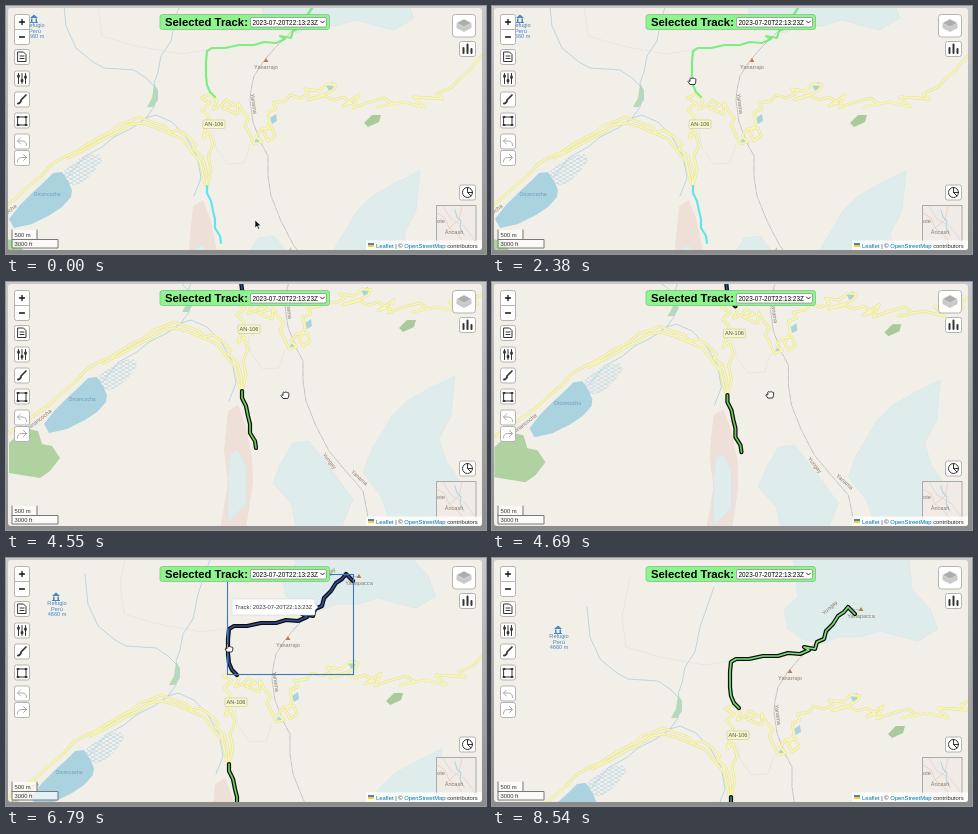
Animation of 480 by 248 pixels, one loop 8610 ms. Source, as an HTML page:

```html
<!DOCTYPE html>
<html lang="en">
<meta charset="utf-8">
<title>Track selection map</title>
<style>
html, body { margin: 0; width: 100%; height: 100%; overflow: hidden; background: #999 }
svg { display: block; width: 480px; height: 248px; font-family: "Liberation Sans", Arial, sans-serif }
polyline, .line { fill: none; stroke-linejoin: round; stroke-linecap: round }
.water { fill: #aad3df }
.ice { fill: #dfecec; stroke: #d0e3e6; stroke-width: .5 }
.wood { fill: #b0d2a0 }
.stream { stroke: #b3d3e0; stroke-width: .9 }
.trail { stroke: #e8e0da; stroke-width: .7 }
.border { stroke: #bbb5bb; stroke-width: .8; stroke-dasharray: 5 1.2 1.2 1.2 }
.case { stroke: #e2df9c; stroke-width: 2.8 }
.fill { stroke: #f7f6b6; stroke-width: 1.8 }
.place { font-size: 5.6px; fill: #8b7a6d; text-anchor: middle }
.outline { stroke: #0a0f0a; stroke-width: 4.2 }
.core { stroke-width: 1.7 }
.p0 .outline { stroke: none }
.p0 .core { stroke-width: 2.2; stroke-opacity: .8 }
.p0 .upper { stroke: #62ee6b } .p0 .lower { stroke: #3de4ec }
.p1 .upper { stroke: #344a9c } .p1 .lower { stroke: #6ccb58 }
.p2 .upper { stroke: #7be07b } .p2 .lower { stroke: #2c9483 }
.btn { fill: #fff; stroke: #b5b3b0; stroke-width: 1 }
.icon { fill: none; stroke: #333; stroke-width: 1; stroke-linecap: round; stroke-linejoin: round }
.off { stroke: #aaa }
.small { font-size: 5.85px; fill: #333 }
.hover rect { fill: none; stroke: #3878bd; stroke-width: 1.1 }
.hover .tip { fill: #fff; stroke: #ccc; stroke-width: .5 }
</style>
<svg id="stage" viewBox="0 0 480 248">
<defs>
  <pattern id="marsh" width="7" height="4" patternUnits="userSpaceOnUse">
    <path d="M0 1h4M3.5 3h3.5" stroke="#9ccbe2" stroke-width=".8"/>
  </pattern>
  <linearGradient id="frame" x2="0" y2="1"><stop stop-color="#c9c9c9"/><stop offset="1" stop-color="#8b8b8b"/></linearGradient>
  <clipPath id="view"><rect x="2" y="2" width="474" height="242" rx="3"/></clipPath>
  <polyline id="road" points="-40,228 -22,214 -6,204 8,194 22,181 35,170 46,158 60,150 70,146 82,138 92,132 103,127 112,119 124,115 133,111 146,116 158,120 164,126 172,124 181,130 190,139 187,143 196,150 200,164 201,180"/>
  <polyline id="strand" points="62,152 80,143 96,134 108,128 122,119 134,117 148,121 160,126 176,133 186,146 194,156 199,178"/>
  <polyline id="loops" points="201,180 205,164 202,150 207,139 203,126 197,132 203,111 196,104 204,97 195,92 204,88 211,95 207,103 215,100 220,94 228,99 217,102 231,108 232,97 237,106 243,112 239,119 245,131 248,138 256,136 250,130 256,123 266,122 269,130 262,135 258,127 264,117 262,106 270,103 267,97 279,95 284,89 294,92 303,88 299,83 313,85 321,78 330,79 327,84 314,91 302,94"/>
  <polyline id="east" points="303,93 316,89 328,94 337,91 346,97 337,100 353,89 347,102 360,97 378,92 387,98 372,101 397,96 418,101 408,91 425,92 437,93 431,88 446,81 455,71 463,65 469,57 478,48"/>
  <polyline id="upper" points="209,91 204,86 201,79 200,70 200,55 201,45 206,42 219,42 233,39 248,39 258,36 270,37 279,33 274,30 285,32 287,25 294,22 296,14 303,7 308,-1 314,-5 318,-10 325,-3"/>
  <polyline id="lower" points="201,180 201,187 205,195 207,205 209,213 209,222 214,230 215,237"/>
</defs>
<rect width="480" height="248" fill="url(#frame)"/>
<g clip-path="url(#view)">
  <rect width="480" height="248" fill="#f2efe9"/>
  <g id="map">
    <polygon class="ice" points="262,-70 268,-20 254,-7 258,12 272,22 292,27 308,20 330,20 350,14 372,20 388,24 408,12 400,-8 382,-28 378,-70"/>
    <polygon class="ice" points="414,165 389,177 366,190 350,206 341,222 330,240 322,262 340,285 352,320 440,330 425,280 405,250 398,228 410,205"/>
    <polygon class="ice" points="252,232 240,252 232,272 250,292 258,330 295,330 312,288 287,254 268,230"/>
    <polygon points="187,200 197,194 204,212 211,245 212,272 203,330 177,330 187,272 183,240" fill="#eee0d8"/>
    <polygon class="ice" points="189,243 197,239 205,256 205,293 187,311 187,271"/>
    <polygon class="wood" points="-32,232 -16,217 -3,220 1,233 11,235 19,247 9,260 -1,267 -32,262"/>
    <polygon points="358,117 366,109 375,109 373,116 362,121" fill="#a9cb9b"/>
    <polygon points="141,101 146,92 148,78 152,84 152,94 147,101" fill="#b8d9b8"/>
    <polygon points="55,168 66,158 78,150 92,148 97,153 88,166 76,177 64,180" fill="url(#marsh)"/>
    <polygon class="water" points="3,213 14,199 26,187 38,176 47,167 56,166 62,175 66,184 65,191 56,201 44,209 26,218 8,222"/>
    <polygon class="water" points="264,112 270,108 271,115 266,118"/>
    <polygon class="water" points="320,79 327,76 329,82 323,85"/>
    <polygon class="water" points="249,134 254,131 255,136 250,138"/>
    <polyline class="trail" points="100,-40 92,0 96,30 130,40 175,48 200,44"/>
    <polyline class="trail" points="207,125 210,142 222,158 238,157 244,139"/>
    <polyline class="stream" points="57,-10 60,20 70,42 87,56 98,62 128,64 140,72 148,80"/>
    <polyline class="stream" points="62,170 78,151 96,141 108,131 126,122 140,112 148,101 151,88 148,77 152,66 155,50 165,35 170,10 184,-30"/>
    <polyline class="stream" points="140,112 150,109 166,116 180,131 191,150 195,172 188,190"/>
    <polyline class="border" points="331,-7 316,-9 305,1 298,16 283,28 268,43 257,56 248,70 245,84 244,95 247,116 255,137 262,150 262,170 265,190 275,215 288,240 303,258 322,280 326,300 330,330"/>
    <g class="case"><use href="#strand"/><use href="#road"/><use href="#loops"/><use href="#east"/></g>
    <g class="fill"><use href="#strand"/><use href="#road"/><use href="#loops"/><use href="#east"/></g>
    <rect x="197" y="114" width="22" height="8.5" rx="1" fill="#f6f6c8" stroke="#cfcd9c" stroke-width=".7"/>
    <g class="place">
      <text x="208" y="120.3" fill="#555">AN-106</text>
      <path d="M260 52l2.4 4h-4.8zM331-10l2.4 4h-4.8z" fill="#b97a4c"/>
      <text x="260" y="63">Yanarrajo</text>
      <text x="331" y="1">Yanapacca</text>
      <text transform="translate(246 98) rotate(82)">Yanama</text>
      <text transform="translate(301 -8) rotate(-42)">Yungay</text>
      <text transform="translate(287 251) rotate(52)">Yungay</text>
      <text transform="translate(317 268) rotate(42)">Yanama</text>
      <text transform="translate(-2 211) rotate(-38)">Chinancocha</text>
      <text x="41" y="190" style="fill:#6a9bb5;font-size:5px">Orconcocha</text>
      <g style="fill:#4687c4">
        <path d="M24 12l4-3.500 4 3.500zM25 12.500h1.500V16H25zM29.500 12.500H31V16h-1.500zM24 16h8v1h-8z"/>
        <text x="29" y="21">Refugio</text><text x="29" y="26.5">Perú</text><text x="29" y="32">4660 m</text>
      </g>
    </g>
    <g class="outline"><use href="#upper"/><use href="#lower"/></g>
    <g class="core"><use class="upper" href="#upper"/><use class="lower" href="#lower"/></g>
  </g>

  <g id="hoverLower" class="hover">
    <rect x="198.5" y="179" width="16.5" height="59"/>
    <path class="tip" d="M206 205.5l3-3v-3.5q0-1 1-1h81q1 0 1 1v13q0 1-1 1h-81q-1 0-1-1v-3.5z"/>
    <text class="small" x="212" y="207.7">Track: 2023-07-21T21:20:16Z</text>
  </g>
  <g id="hoverUpper" class="hover">
    <rect x="221.5" y="16.5" width="126" height="100"/>
    <path class="tip" d="M312 49l-3-3v-4q0-1-1-1h-81q-1 0-1 1v14q0 1 1 1h81q1 0 1-1v-4z"/>
    <text class="small" x="229" y="51">Track: 2023-07-20T22:13:23Z</text>
  </g>

  <rect x="154" y="8.5" width="169.5" height="15" rx="2.5" fill="#8ef58e" stroke="#7fc583" stroke-width=".8"/>
  <text x="159" y="20" font-size="11.3" font-weight="bold">Selected Track:</text>
  <rect x="244.5" y="11.5" width="76" height="9.5" rx="1.5" fill="#fff" stroke="#777" stroke-width=".6"/>
  <text x="246.5" y="18.6" font-size="6.4">2023-07-20T22:13:23Z</text>
  <path class="icon" d="M314.5 15l2 2 2-2"/>

  <g class="btn">
    <rect x="8.5" y="8.5" width="15" height="30" rx="2"/><path d="M8.5 23.5h15"/>
    <g id="buttons"></g>
    <rect x="446.5" y="8.5" width="23" height="22.5" rx="3"/>
    <rect x="453.5" y="35.5" width="16" height="15" rx="2"/>
    <rect x="453.5" y="179" width="16" height="15" rx="2"/>
  </g>
  <g class="icon">
    <path d="M13.500 16h5M16 13.500v5M13.500 31h5" stroke="#111" stroke-width="1.300"/>
    <path d="M12 46h5.500l2.500 2.500v7h-8zM14 50h4M14 52.500h4"/>
    <path d="M12.500 67.500v10M16 67.500v10M19.500 67.500v10"/>
    <path d="M12.500 70v.5M16 74.500v.5M19.500 71v.5" stroke-width="2.800"/>
    <path d="M15 94l5-5" stroke-width="1.700"/><path d="M12 97.500q2 0 3-2.500" stroke-width="2"/>
    <path d="M12 111h8v8h-8z"/>
    <path d="M11.500 111h1M19.500 111h1M11.500 119h1M19.500 119h1" stroke-width="2"/>
    <path class="off" d="M14.500 132l-3 3 3 3M11.500 135h5q4 0 4 4.500"/>
    <path class="off" d="M17.500 148.500l3 3-3 3M20.500 151.500h-5q-4 0-4 4.500"/>
    <path d="M457.500 47v-5M461.500 47v-8.500M465.500 47v-4" stroke-width="2"/>
    <circle cx="461.500" cy="186.500" r="5"/><path d="M461.500 181.500v5h5M461.500 186.500l3.500 3.500"/>
  </g>
  <path d="M450.500 17.500v4.500l7.500 4 7.500-4v-4.500z" fill="#c9c9c9"/>
  <path d="M450.500 17l7.500 4 7.500-4-7.500-4z" fill="#adadad" stroke="#eee" stroke-width=".5"/>

  <g id="mini">
    <rect x="430.500" y="199.500" width="39.500" height="40" fill="#f0ebe6" stroke="#aaa" stroke-width="1"/>
    <path class="line" d="M431 207l8 5 4 10 9 7 7 9M443 222l10-8 3-14" stroke="#e4d0c2" stroke-width=".8"/>
    <path class="line" d="M449 204l2 7 4 4-1 6 4 8" stroke="#b5d5e4" stroke-width="1.100"/>
    <path class="line" d="M437 200l8 13 14 8 10 14" stroke="#d6cdd6" stroke-width=".6"/>
    <text class="place" x="448" y="228">Áncash</text><text class="place" x="435" y="217">ote</text>
  </g>
  <rect x="360" y="234.500" width="116" height="10" fill="#fff" fill-opacity=".8"/>
  <path d="M362 237h6v2h-6z" fill="#4c7be1"/><path d="M362 239h6v2h-6z" fill="#ffd500"/>
  <text class="small" x="370" y="241.500"><tspan fill="#0078a8">Leaflet</tspan> | © <tspan fill="#0078a8">OpenStreetMap</tspan> contributors</text>

  <path d="M6 224h25v9H6zM6 233.500h46v8.500H6z" fill="#fff" fill-opacity=".7"/>
  <path class="line" d="M6 224v18h46v-8.500H6M31 224v9.500" stroke="#777" stroke-width="1"/>
  <text class="small" x="8.500" y="231">500 m</text><text class="small" x="8.500" y="240">3000 ft</text>
</g>

<g id="cursor">
  <path id="arrow" d="M-1-4v8l2-1.800 1.300 3 1.300-.6-1.300-2.900H5z" fill="#111" stroke="#fff" stroke-width=".6"/>
  <path id="hand" d="M-2 3.500L-4 .5q.5-1.500 2 0v-3q.8-1 1.500 0 .7-1 1.500 0 .8-.8 1.500.2 1-.6 1.300.6V1l-1 2.500z" fill="#fff" stroke="#222" stroke-width=".9"/>
  <path id="finger" d="M-2 4L-4 1q.5-1.500 2 0v-5q.8-1.200 1.500 0v3q.8-1 1.500 0 .8-.8 1.500.2 1-.6 1.300.6V2l-1 2z" fill="#fff" stroke="#222" stroke-width=".9"/>
</g>
</svg>
<script>
const LOOP = 8610, STEP = 70;
const $ = id => document.getElementById(id);

$('buttons').innerHTML = [43.5, 65, 86, 107, 128, 144.5]
  .map(y => `<rect x="8.5" y="${y}" width="15" height="15" rx="2"/>`).join('');

// Keys are [time, x, y]; motion eases between neighbours.
const pan = [[0, 0, 0], [4060, 0, 0], [4480, 35, -71], [4620, 35, -71], [5180, 22, 26], [7700, 22, 26], [8260, 38, 59]];
const pointer = [[0, 250, 218], [70, 250, 218], [1190, 200, 75], [2940, 200, 75], [3360, 205, 198], [3850, 205, 198],
  [4060, 244, 184], [4480, 279, 113], [4620, 279, 113], [5180, 252, 103], [5390, 252, 103], [6020, 223, 90],
  [7350, 223, 90], [7700, 260, 120], [8260, 276, 153]];

function at(keys, t) {
  const i = keys.findIndex(k => k[0] > t);
  if (i < 0) return keys.at(-1).slice(1);
  const [a, b] = [keys[i - 1], keys[i]];
  const p = (t - a[0]) / (b[0] - a[0]), e = p * p * (3 - 2 * p);
  return [a[1] + (b[1] - a[1]) * e, a[2] + (b[2] - a[2]) * e];
}
const move = (id, xy) => $(id).setAttribute('transform', `translate(${xy})`);
const show = (id, on) => $(id).style.display = on ? '' : 'none';

function draw(now) {
  const t = Math.floor(now % LOOP / STEP) * STEP;
  const overLower = t >= 3360 && t < 3850, overUpper = t >= 5950 && t < 7350;
  move('map', at(pan, t));
  move('cursor', at(pointer, t));
  $('stage').setAttribute('class', t < 3850 ? 'p0' : t < 7280 ? 'p1' : 'p2');
  show('hoverLower', overLower);
  show('hoverUpper', overUpper);
  show('arrow', t < 210);
  show('finger', overLower || overUpper);
  show('hand', t >= 210 && !overLower && !overUpper);
  show('cursor', t < 8400);
  requestAnimationFrame(draw);
}
requestAnimationFrame(draw);
</script>
</html>
```
